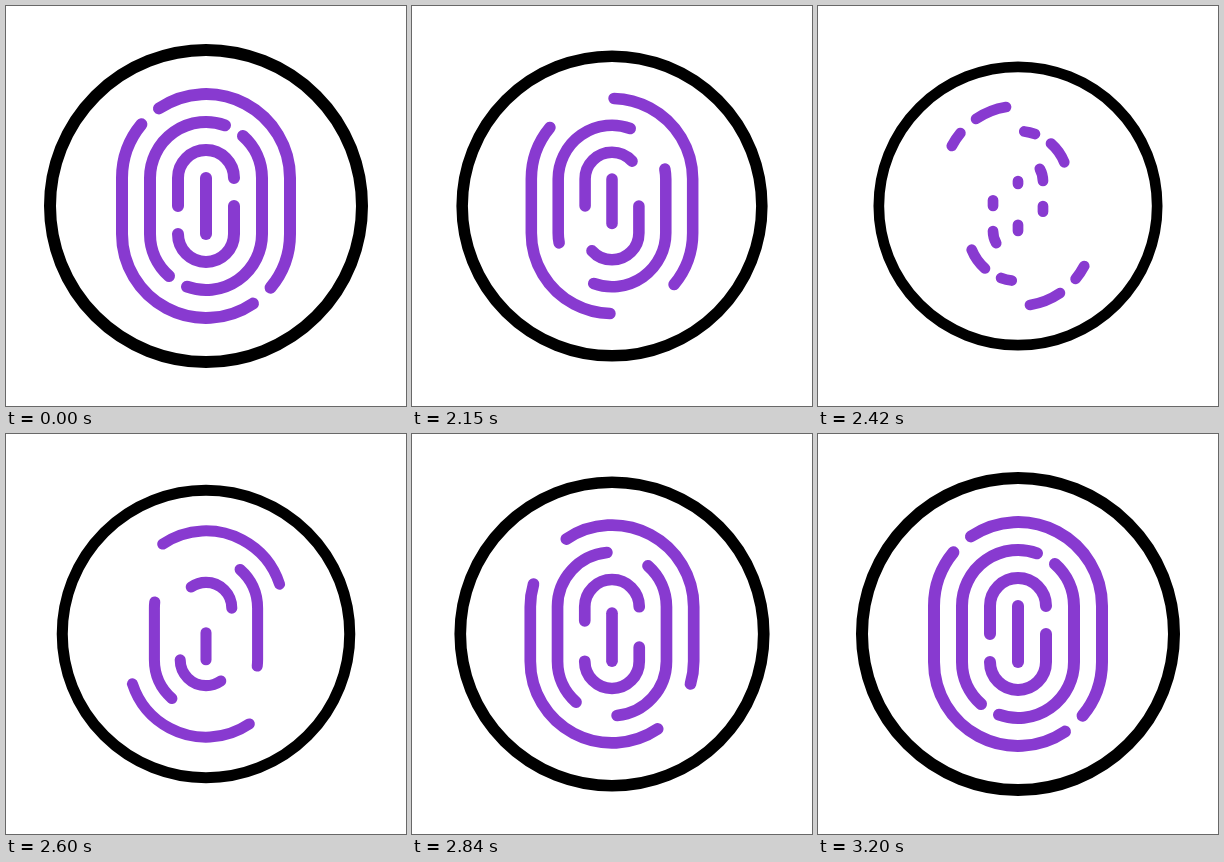
These frames come from a looping animation (400 by 400 pixels, 3.23 s). An HTML page:

```html
<!DOCTYPE html>
<html lang="en">
<head>
<meta charset="utf-8">
<title>Fingerprint scan</title>
<style>
  html, body { margin: 0; width: 100%; height: 100%; overflow: hidden; background: #fff; }
  svg { display: block; width: 100vw; height: 100vh; }
</style>
</head>
<body>
<svg viewBox="0 0 400 400" fill="none" stroke-width="12" stroke-linecap="round">
  <g id="icon">
    <circle cx="200" cy="200" r="156" stroke="#000"/>
    <g id="ridges" stroke="#883ad0"></g>
  </g>
</svg>
<script>
const LOOP = 3230, HOLD = 2030, STEP = 30, SMALL = 0.89;
const icon = document.getElementById('icon');
const ridges = document.getElementById('ridges');

function addRidge(d, turn) {
  const p = document.createElementNS('http://www.w3.org/2000/svg', 'path');
  p.setAttribute('d', d);
  p.setAttribute('pathLength', 1);
  if (turn) p.setAttribute('transform', 'rotate(180 200 200)');
  ridges.append(p);
  return p;
}

// Each curved ridge has a twin turned by half a circle.
const paths = [
  'M153 102.4A84 84 0 0 1 284 172V228A84 84 0 0 1 264.6 281.7',
  'M237 130A56 56 0 0 1 256 172V228A56 56 0 0 1 181 280.7',
  'M228 172A28 28 0 0 0 172 172V200'
].flatMap(d => [addRidge(d, false), addRidge(d, true)]);
paths.push(addRidge('M200 228V172', false));

// Cubic easing with handles (a, 0) and (b, 1)
function ease(x, a, b) {
  if (x <= 0) return 0;
  if (x >= 1) return 1;
  let lo = 0, hi = 1;
  for (let i = 0; i < 30; i++) {
    const s = (lo + hi) / 2, r = 1 - s;
    if (3 * r * r * s * a + 3 * r * s * s * b + s * s * s < x) lo = s; else hi = s;
  }
  return lo * lo * (3 - 2 * lo);
}

const span = (k, from, to, a, b) => ease((k - from) / (to - from), a, b);

function draw(time) {
  const t = time % LOOP;
  const k = t < HOLD ? 0 : Math.floor((t - HOLD) / STEP) + 1;

  const shrink = span(k, 0, 12, 0.42, 0.58) - span(k, 12, 40, 0.3, 0.45);
  const scale = 1 - (1 - SMALL) * shrink;
  icon.setAttribute('transform', `translate(200 200) scale(${scale}) translate(-200 -200)`);

  const out = span(k, 0, 16, 0.42, 0.72);   // old stroke leaves
  const grow = span(k, 7, 40, 0.43, 0.26);  // new stroke enters
  const dash = grow > 0 ? `${grow} ${out < 1 ? out - grow : 2} 2 2` : '2 2';
  const offset = grow > 0 ? 0 : -out;
  for (const p of paths) {
    p.setAttribute('stroke-dasharray', dash);
    p.setAttribute('stroke-dashoffset', offset);
  }
}

const start = performance.now();
function tick() {
  draw(performance.now() - start);
  requestAnimationFrame(tick);
}
tick();
</script>
</body>
</html>
```
